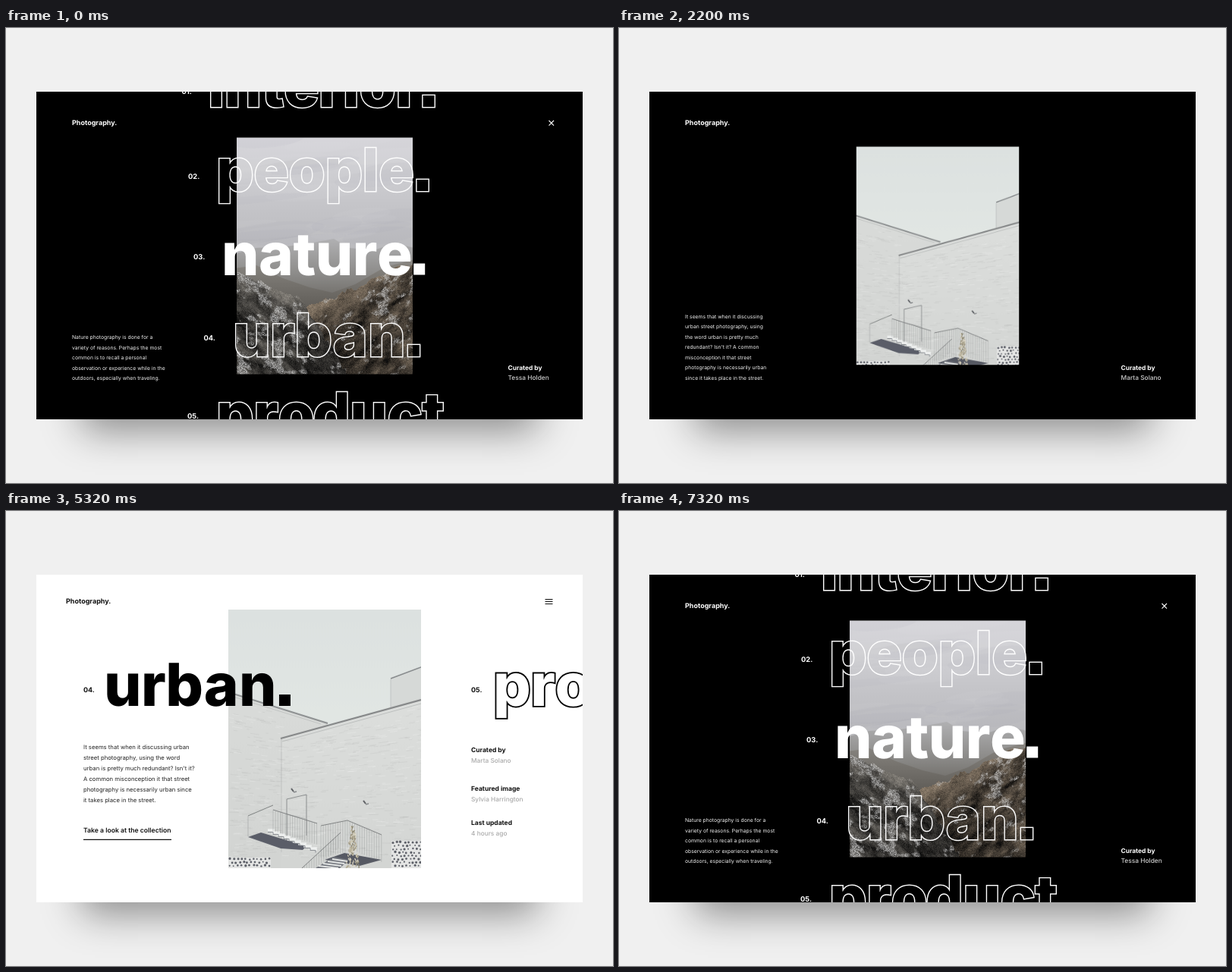
An HTML page with a canvas that plays this animation: 800 by 600 pixels, repeating every 7360 ms.

```html
<!DOCTYPE html>
<html lang="en">
<head>
<meta charset="utf-8">
<title>Photography</title>
<style>
html, body { margin: 0; width: 100%; height: 100%; overflow: hidden; background: #f0f0f0; }
canvas { position: absolute; left: 40px; top: 84px; box-shadow: 0 75px 48px -60px rgba(0, 0, 0, .42); }
</style>
</head>
<body>
<canvas id="stage"></canvas>
<script>
const LOOP = 7360, CX = 420, CY = 300.4;
const clamp = p => Math.max(0, Math.min(1, p));
const span = (t, from, to) => clamp((t - from) / (to - from));
const lerp = (a, b, p) => a + (b - a) * p;
const smooth = p => p * p * (3 - 2 * p);
const quad = p => p < .5 ? 2 * p * p : 1 - 2 * (1 - p) ** 2;
const cubic = p => p < .5 ? 4 * p ** 3 : 1 - 4 * (1 - p) ** 3;

// Every surface is addressed in page coordinates; (x, y) is its top left corner.
function surface(x, y, w, h, canvas = document.createElement('canvas')) {
  canvas.width = w;
  canvas.height = h;
  const c = canvas.getContext('2d');
  c.textRendering = 'geometricPrecision';
  c.translate(-x, -y);
  return c;
}
const ctx = surface(40, 84, 720, 432, document.getElementById('stage'));
const layer = surface(40, 84, 720, 432);

let seed = 7;
const rnd = (a = 0, b = 1) => {
  seed = (seed * 1664525 + 1013904223) % 4294967296;
  return a + (b - a) * seed / 4294967296;
};

function path(c, ...pts) {
  c.beginPath();
  for (let i = 0; i < pts.length; i += 2) c.lineTo(pts[i], pts[i + 1]);
}
function poly(c, fill, ...pts) {
  path(c, ...pts);
  c.fillStyle = fill;
  c.fill();
}
function line(c, color, width, ...pts) {
  path(c, ...pts);
  c.strokeStyle = color;
  c.lineWidth = width;
  c.stroke();
}
function gradient(c, y0, y1, ...colors) {
  const g = c.createLinearGradient(0, y0, 0, y1);
  colors.forEach((color, i) => g.addColorStop(i / (colors.length - 1), color));
  return g;
}

const hash = (x, y) => {
  const v = Math.sin(x * 127.1 + y * 311.7) * 43758.5453;
  return v - Math.floor(v);
};
function noise(x, y) {
  const i = Math.floor(x), j = Math.floor(y), u = smooth(x - i), v = smooth(y - j);
  return lerp(lerp(hash(i, j), hash(i + 1, j), u), lerp(hash(i, j + 1), hash(i + 1, j + 1), u), v);
}
const fbm = (x, y) => noise(x, y) * .5 + noise(x * 2.1, y * 2.1) * .3 + noise(x * 4.3, y * 4.3) * .2;

function paintValley() {
  const c = surface(293, 130, 254, 341);
  c.fillStyle = gradient(c, 130, 300, '#d8d7dc', '#cfcfd3', '#c3c3c7', '#b9b9bc');
  c.fillRect(293, 130, 254, 341);
  for (let i = 0; i < 30; i++) {
    c.fillStyle = i % 2 ? 'rgba(255,255,255,.03)' : 'rgba(110,110,120,.03)';
    c.beginPath();
    c.ellipse(rnd(293, 547), rnd(140, 280), rnd(30, 90), rnd(4, 12), -.1, 0, 7);
    c.fill();
  }
  poly(c, gradient(c, 278, 370, '#b1b1b3', '#8d8c8a', '#65625d'),
    293, 300, 330, 290, 370, 288, 405, 283, 432, 278, 452, 290, 485, 293, 512, 284, 547, 292, 547, 471, 293, 471);
  poly(c, gradient(c, 305, 380, '#8b8883', '#595651'),
    293, 318, 330, 313, 365, 330, 400, 342, 430, 349, 460, 338, 500, 315, 547, 303, 547, 471, 293, 471);

  // Two noisy slopes meet in the valley; snow gathers on the gullies.
  for (let x = 293; x < 547; x++) {
    const rough = fbm(x / 14, 3) * 14 - 7;
    const leftTop = 320 + (x - 304) * .42 + rough, rightTop = 309 + (536 - x) * .42 + rough;
    for (let y = 300; y < 471; y++) {
      const left = x < 400 + (y - 375) * .6 + rough, top = left ? leftTop : rightTop;
      if (y < top) continue;
      const down = left ? (x * .75 + y * .66) / 22 : (y * .66 - x * .75) / 22;
      const across = left ? (y * .75 - x * .66) / 9 : (y * .75 + x * .66) / 10;
      const relief = fbm(down, across), grain = hash(x, y);
      const cover = left ? .5 + (x - 304) * .0008 : .63 - span(x, 450, 530) * (1 - span(y, 360, 420)) * .1;
      const snow = span(fbm(down * 1.7 + 9, across), cover, cover + .14) * (.25 + grain * .75);
      const depth = span(y - top, 0, 45), deep = 1 - .35 * clamp(1 - Math.abs(x - 430) / 90);
      const light = lerp(108, 62 * deep, depth) + (relief - .5) * 120 * deep + (grain - .5) * 28;
      const tint = left ? [1, .97, .92] : [1.12, 1, .86];
      const [r, g, b] = tint.map(k => lerp(Math.max(14, light * k), 205, snow * .8));
      c.fillStyle = `rgb(${r},${g},${b})`;
      c.fillRect(x, y, 1, 1);
    }
  }
  return c.canvas;
}

function dots(c, x0, y0, x1, y1) {
  c.fillStyle = '#e4e5e4';
  c.fillRect(x0, y0, x1 - x0, y1 - y0);
  c.fillStyle = '#5b5e66';
  for (let y = y0 + 2, row = 0; y < y1; y += 4.4, row++)
    for (let x = x0 + 2 + row % 2 * 2.5; x < x1; x += 5.2) {
      c.beginPath();
      c.arc(x + rnd(-.9, .9), y + rnd(-.8, .8), rnd(.9, 1.7), 0, 7);
      c.fill();
    }
}

function railing(c, x0, y0, x1, y1, drop) {
  line(c, '#77797a', .9, x0, y0, x1, y1);
  for (let x = x0; x <= x1; x += 3.2) {
    const y = lerp(y0, y1, (x - x0) / (x1 - x0));
    line(c, 'rgba(120,123,126,.55)', .5, x, y, x, y + drop);
  }
}

function paintBuilding() {
  const c = surface(293, 130, 254, 341);
  c.fillStyle = gradient(c, 130, 290, '#dce1e0', '#e2e7e4');
  c.fillRect(293, 130, 254, 341);
  poly(c, '#d6d9d7', 507, 262, 507, 222, 547, 207, 547, 262);
  line(c, '#85888a', 1.6, 507, 221, 547, 206);
  line(c, '#b9bcbc', .8, 507, 222, 507, 262);
  poly(c, gradient(c, 240, 471, '#d9dbd9', '#d2d4d2'), 293, 239, 424, 280, 424, 471, 293, 471);
  line(c, '#8d9091', 2, 293, 239, 424, 280);
  line(c, '#c1c4c3', 1, 293, 243, 415, 281);
  poly(c, gradient(c, 250, 471, '#dcdedc', '#d8dad8', '#d3d5d3'), 363, 301, 547, 250, 547, 471, 363, 471);
  line(c, '#858788', 2.2, 362, 300, 547, 249);
  line(c, '#bcbfbe', 1, 364, 304, 547, 254);
  line(c, '#bfc1c0', 1, 363, 301, 363, 450);
  for (let i = 0; i < 800; i++) {
    const x = rnd(293, 547), y = rnd(250, 460), left = x < 363;
    const roof = left ? 245 + (x - 293) * .32 : 306 - (x - 363) * .277;
    if (y < roof) continue;
    const slope = (left ? .22 : -.2) * (420 - y) / 180, len = rnd(3, 14);
    line(c, i % 3 ? 'rgba(135,139,138,.16)' : 'rgba(255,255,255,.3)', .7, x, y, x + len, y + len * slope);
  }
  // Door, lamps, stairs
  line(c, '#8b8e8f', 1, 370, 434, 370, 380, 396, 374, 396, 428);
  line(c, '#a9acab', .7, 370, 400, 396, 406);
  for (const [x, y] of [[379, 369], [474, 385]]) {
    line(c, '#5c5f63', 2, x - 3, y - 3, x, y + 1);
    line(c, '#85888a', 1.6, x, y + 2, x + 4, y + 1);
  }
  poly(c, '#5a5d68', 319, 430, 336, 424, 396, 442, 391, 447, 362, 445);
  const steps = [345, 421];
  for (let i = 0, x = 345, y = 421; i < 9; i++) steps.push(x += 7, y, x, y += 3);
  line(c, '#eef0ef', 3.6, ...steps);
  line(c, '#777a80', .8, ...steps.map((v, i) => i % 2 ? v + 2.5 : v));
  line(c, '#737677', .9, 319, 402, 352, 388);
  railing(c, 352, 394, 410, 412, 28);
  line(c, '#a0a3a3', .6, 319, 402, 319, 429);
  poly(c, '#565963', 420, 460, 446, 451, 495, 460, 466, 468);
  railing(c, 415, 415, 450, 408, 42);
  railing(c, 450, 408, 495, 427, 36);
  railing(c, 390, 471, 441, 424, 18);
  poly(c, '#70737b', 408, 471, 432, 456, 452, 460, 440, 471);
  for (let i = 0; i < 4; i++) line(c, '#e6e8e7', 2, 412 + i * 6, 468 - i * 3, 438 + i * 4, 471 - i * 3);
  dots(c, 293, 457, 349, 471);
  dots(c, 508, 435, 547, 471);
  for (let i = 0; i < 130; i++) {
    const y = rnd(418, 471), r = 2 + (y - 418) * .13, x = 457 + rnd(-r, r);
    line(c, ['#c9c2ab', '#a59d87', '#dcd7c6', '#8d8875'][i % 4], 1.3, x, y, x + rnd(-2, 2), y - 3);
  }
  return c.canvas;
}

const valley = paintValley(), building = paintBuilding();

function photo(img, w, h, scale, alpha = 1) {
  if (!alpha) return;
  ctx.save();
  ctx.globalAlpha = alpha;
  ctx.beginPath();
  ctx.rect(CX - w / 2, CY - h / 2, w, h);
  ctx.clip();
  ctx.drawImage(img, CX - 127 * scale, CY - 170.5 * scale, 254 * scale, 341 * scale);
  ctx.restore();
}

function text(str, x, y, size, weight, color, alpha = 1) {
  if (!alpha) return;
  ctx.globalAlpha = alpha;
  ctx.font = `${weight} ${size}px Inter, sans-serif`;
  ctx.fillStyle = color;
  ctx.fillText(str, x, y);
  ctx.globalAlpha = 1;
}
const lines = (list, x, y, step, size, color, alpha) =>
  list.forEach((s, i) => text(s, x, y + i * step, size, 400, color, alpha));

// Large word with a square full stop; shift(i) moves each letter inside the line's mask.
function word(str, left, base, color, outline, shift = () => 0, tilt = 0) {
  const c = layer, bottom = base + (str.includes('p') ? 19 : 10);
  c.clearRect(0, 0, 800, 600);
  c.save();
  c.font = '800 78px Inter, sans-serif';
  c.letterSpacing = '-0.5px';
  c.lineJoin = 'miter';
  c.miterLimit = 3;
  c.translate(left, bottom);
  c.rotate(tilt * Math.PI / 180);
  c.translate(-left, -bottom);
  c.beginPath();
  c.rect(left - 10, base - 64, 500, bottom - base + 64);
  c.clip();
  const draw = mode => [...str].forEach((ch, i) => {
    const x = left - 1 + c.measureText(str.slice(0, i)).width, y = base + shift(i);
    if (ch === '.') c[mode + 'Rect'](x + 4, y - 15, 15, 15);
    else c[mode + 'Text'](ch, x, y);
  });
  c.fillStyle = c.strokeStyle = color;
  if (outline) {
    c.lineWidth = outline * 2;
    draw('stroke');
    c.globalCompositeOperation = 'destination-out';
  }
  draw('fill');
  c.restore();
  ctx.drawImage(c.canvas, 40, 84);
}

const rows = [
  // label, word, label x, word x, baseline, label centre above baseline
  ['01.', 'interior.', 231.5, 267, 104, 20],
  ['02.', 'people.', 240, 278, 215, 19],
  ['03.', 'nature.', 247, 285, 325.5, 24],
  ['04.', 'urban.', 260.5, 300, 433, 24],
  ['05.', 'product.', 239, 278, 536.5, 24.5]
];
function list(scroll, active, shift, alpha) {
  rows.forEach(([label, str, lx, x, y, up], i) => {
    const base = y - scroll;
    if (base < 60) return;
    word(str, x, base, '#fff', i === active ? 0 : 1.4, shift);
    text(label, lx, base - up + 3.4, 9.4, 700, '#fff', alpha);
  });
}

const natureText = ['Nature photography is done for a', 'variety of reasons. Perhaps the most',
  'common is to recall a personal', 'observation or experience while in the', 'outdoors, especially when traveling.'];
const urbanText = ['It seems that when it discussing', 'urban street photography, using', 'the word urban is pretty much',
  'redundant? Isn\'t it? A common', 'misconception it that street', 'photography is necessarily urban',
  'since it takes place in the street.'];
const urbanWide = ['It seems that when it discussing urban', 'street photography, using the word',
  'urban is pretty much redundant? Isn\'t it?', 'A common misconception it that street',
  'photography is necessarily urban since', 'it takes place in the street.'];

function darkTexts(t) {
  const gone = 1 - span(t, 2360, 2800);
  const first = 1 - span(t, 800, 1060), second = span(t, 1040, 1480) * gone;
  lines(natureText, 87, 410, 13.5, 6.8, '#f2f2f2', first);
  lines(urbanText, 87, 382.7, 13.5, 6.8, '#f2f2f2', second);
  text('Curated by', 661.5, 451, 8.4, 700, '#fff', gone);
  text('Tessa Holden', 661.5, 464.3, 8.4, 500, '#ccc', first);
  text('Marta Solano', 661.5, 464.3, 8.4, 500, '#ccc', second);
  ctx.globalAlpha = 1 - span(t, 1600, 2000);
  line(ctx, '#fff', 1.1, 715.5, 122, 722, 128.6);
  line(ctx, '#fff', 1.1, 722, 122, 715.5, 128.6);
  ctx.globalAlpha = 1;
}

function darkTitles(t) {
  const rise = (start, step, dur) => i => 84 * quad(span(t - i * step, start, start + dur));
  if (t < 780) {
    const out = rise(40, 35, 420);
    list(0, 2, i => -out(i), 1 - span(t, 300, 700));
  } else if (t < 1590) {
    const enter = rise(780, 30, 380);
    list(112, 3, i => 84 - enter(i), span(t, 860, 1200));
  } else if (t < 2400) {
    const out = rise(1600, 35, 450);
    list(112, 3, i => -out(i), 1 - span(t, 1800, 2200));
  }
}

function lightPanel(t) {
  const top = 84 + (t < 4600 ? 432 * 2 ** (-10 * span(t, 3200, 4600)) : 0);
  ctx.save();
  ctx.beginPath();
  ctx.rect(40, top, 720, 516 - top);
  ctx.clip();
  ctx.fillStyle = '#fff';
  ctx.fillRect(40, 84, 720, 432);
  text('Photography.', 79, 122, 9, 700, '#111');
  for (const y of [116.5, 119.5, 122.5]) line(ctx, '#111', 1, 710.5, y, 720.5, y);
  lines(urbanWide, 102, 314.3, 14, 7.7, '#222');
  text('Take a look at the collection', 102, 423.5, 8.65, 600, '#111');
  line(ctx, '#111', 1.2, 102, 433.3, 218, 433.3);
  [['Curated by', 'Marta Solano', 318.2], ['Featured image', 'Sylvia Harrington', 369], ['Last updated', '4 hours ago', 414.4]]
    .forEach(([head, value, y]) => {
      text(head, 613, y, 8.5, 700, '#111');
      text(value, 613, y + 13.6, 8.3, 500, '#aaa');
    });
  text('05.', 613, 239.2, 9, 700, '#111');
  word('product.', 643, 257, '#000', 1.8);
  ctx.restore();
}

function scene(t) {
  ctx.fillStyle = '#000';
  ctx.fillRect(40, 84, 720, 432);
  text('Photography.', 87, 128, 9, 700, '#fff');
  if (t > 3200) lightPanel(t);

  if (t < 3040) {
    const p = cubic(span(t, 1600, 2800)), w = lerp(232, 197, p), h = lerp(312, 264, p);
    const scale = lerp(1, .775, p), swap = smooth(span(t, 400, 1100));
    if (swap < 1) photo(valley, w, h, scale);
    photo(building, w, h, scale, swap);
    darkTitles(t);
    darkTexts(t);
  } else {
    const scale = lerp(.775, 1, cubic(span(t, 3040, 3760)));
    photo(building, 254 * scale, 341 * scale, scale);
    if (t > 3340) {
      const enter = i => 80 * (1 - quad(span(t - i * 63, 3348, 4048)));
      word('urban.', 130, 257, '#000', 0, enter, 5 * (1 - quad(span(t, 3348, 4348))));
    }
    text('04.', 102, 239.2, 9, 700, '#111', span(t, 4520, 4680));
  }
}

function frame(now) {
  const t = now % LOOP, back = t >= 6720;
  scene(back ? 0 : t);
  const veil = back ? (1 - span(t, 6720, 7320)) ** 2 : smooth(span(t, 6240, 6700));
  if (veil) {
    ctx.fillStyle = `rgba(255,255,255,${veil})`;
    ctx.fillRect(40, 84, 720, 432);
  }
  requestAnimationFrame(frame);
}
frame(0);
</script>
</body>
</html>
```
